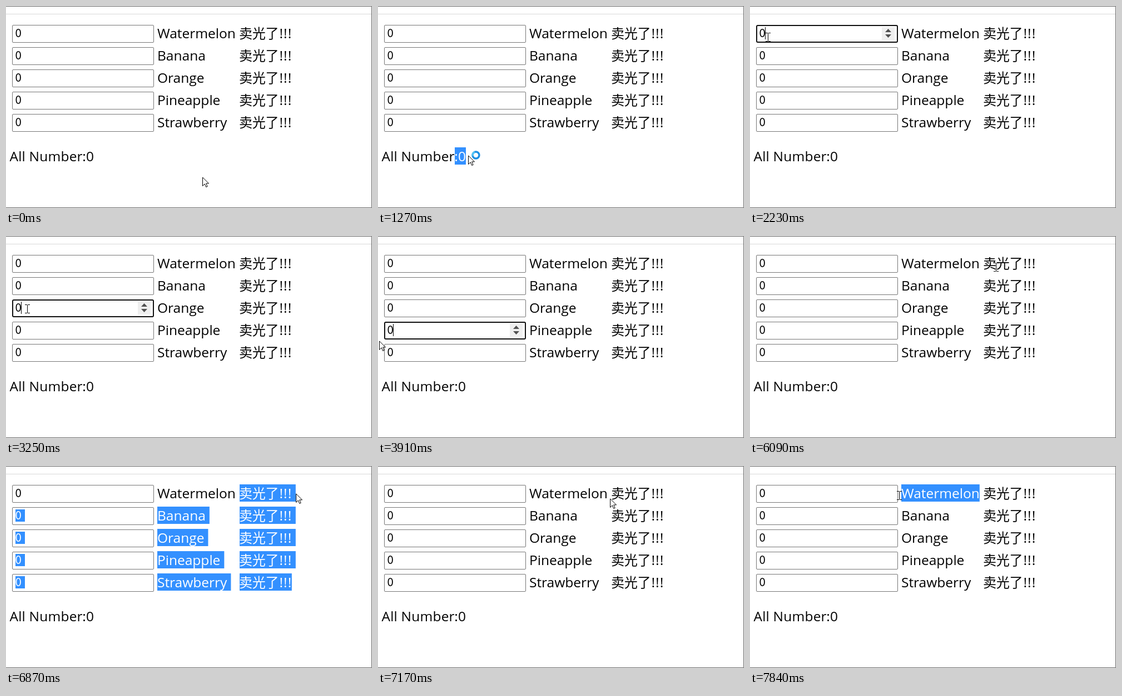
Write an HTML page that moves like this. It is 658 px wide and 363 px high and loops after 7990 ms.

```html
<!DOCTYPE html>
<html lang="en">
<head>
<meta charset="utf-8">
<title>Fruit stock</title>
<style>
  html, body { margin: 0; width: 100%; height: 100%; overflow: hidden; background: #fff; }
  svg { display: block; }
  text { font: 24.5px "Open Sans", "Noto Sans", sans-serif; fill: #000; white-space: pre; }
  .total { letter-spacing: .2px; }
  .cjk, .num { font: 24px "Noto Sans CJK SC", "Noto Sans CJK", "Noto Sans CJK JP", sans-serif; }
  .num { font-size: 20.5px; }
  .on { fill: #fff; }
  .mark { fill: #3390ff; }
</style>
</head>
<body>
<svg id="stage" width="658" height="363" viewBox="0 0 658 363"></svg>
<script>
const LOOP = 7990;
const STEP = 136; // typical time between screen updates
const stage = document.getElementById('stage');
const labels = ['Watermelon', 'Banana', 'Orange', 'Pineapple', 'Strawberry'];
const status = '卖光了!!!';
const rowTop = i => 34 + 40 * i;
const charX = i => i < 3 ? 420 + 23.7 * i : 491 + 7.6 * (i - 3);

const pen = document.createElement('canvas').getContext('2d');
pen.font = '24.5px "Open Sans", "Noto Sans", sans-serif';
const labelEnds = labels.map(s => 272 + pen.measureText(s).width);

// Pointer passes through the points at even intervals
const route = (...points) => k => {
  const u = k * (points.length - 1);
  const i = Math.min(Math.floor(u), points.length - 2);
  return [0, 1].map(d => Math.round(points[i][d] + (points[i + 1][d] - points[i][d]) * (u - i)));
};

// Pointer swings out to the left between clicks on successive rows
const weave = (a, b) => k => [
  Math.round(19 + 19 * Math.cos(2 * Math.PI * (b - a) * k)),
  Math.round(51 + 40 * (a + (b - a) * k))
];

const acts = [
  { from: 40, to: 720, at: route([353, 307], [141, 270]) },
  { from: 1000, to: 1960, at: route([148, 270], [164, 268], [36, 175], [32, 80]),
    sel: () => 'total', busy: k => k > .1 && k < .5 },
  { from: 2110, to: 3130, at: weave(0, 1), focus: k => Math.round(k) },
  { from: 3250, to: 4180, at: weave(2, 4), focus: k => Math.round(2 + 2 * k) },
  { from: 4330, to: 4870, at: route([22, 214], [162, 285], [163, 276]),
    focus: () => 4, sel: () => 'field' },
  { from: 5150, to: 6090, at: route([172, 271], [507, 148], [442, 56]) },
  { from: 6210, to: 7170, at: route([421, 52], [470, 50], [521, 50], [521, 49], [417, 58]),
    sel: k => k < .5 ? 'cell' : k < 1 ? 'table' : '' },
  { from: 7290, to: 7410, at: route([385, 57], [349, 57]) },
  { from: 7690, to: 7840, at: route([300, 54], [268, 53]), sel: () => 'word' }
];

const box = (x, y, w, h, attrs) =>
  `<rect x="${x}" y="${y}" width="${w}" height="${h}" ${attrs}/>`;
const mark = (x0, x1, y, h) => box(x0, y, x1 - x0, h, 'class="mark"');
const text = (x, y, str, cls = '', on = false) =>
  `<text x="${x}" y="${y}" class="${cls}${on ? ' on' : ''}">${str}</text>`;

function field(i, focused, hover, sel) {
  const y = rowTop(i);
  const on = sel === 'field' && focused || sel === 'table' && i > 0;
  let s = focused
    ? box(12, y + 1, 253, 30, 'rx="2" fill="#fff" stroke="#101010" stroke-width="2"')
    : box(11.5, y + .5, 254, 31, `rx="1.5" fill="#fff" stroke="${hover ? '#4f4f4f' : '#767676'}"`);
  if (on) s += mark(17, focused ? 28 : 34, y + 4, 22);
  s += text(16.5, y + 22, '0', 'num', on);
  if (focused && !on) s += box(27, y + 4, 1, 22, 'fill="#000"');
  if (focused || hover) {
    s += box(237, y + 4, 23, 23, 'fill="#efefef"') +
      `<path d="M243 ${y + 13}l5.5-6 5.5 6zM243 ${y + 17}l5.5 6 5.5-6z" fill="#505050"/>`;
  }
  return s;
}

function row(i, focus, hover, sel, x) {
  const y = rowTop(i), base = y + 24;
  const all = sel === 'table';
  const labelOn = all && i > 0 || sel === 'word' && i === 0;
  const picked = k => all || sel === 'cell' && i === 0 && charX(k + 1) <= x + 4;
  const count = [...status].filter((_, k) => picked(k)).length;
  let s = field(i, focus === i, hover === i, sel);
  if (labelOn) s += mark(272, labelEnds[i] + (all ? 7 : 0), y - 1, 31);
  if (count) s += mark(420, charX(count) + (all && i < 4 ? 7 : 0), y - 1, 31);
  s += text(272, base, labels[i], '', labelOn);
  [...status].forEach((c, k) => {
    s += text(charX(k) + (k < 3 ? -1 : .5), base, c, k < 3 ? 'cjk' : '', picked(k));
  });
  return s;
}

const total = on => (on ? mark(138, 158, 254, 31) : '') +
  text(6.5, 279, 'All Number', 'total') + text(137.3, 279, ':0', 'total', on);

function isOverText(x, y) {
  if (x >= 6 && x < 158 && y >= 254 && y < 285) return true;
  return labels.some((_, i) => y >= rowTop(i) - 1 && y < rowTop(i) + 31 &&
    (x >= 267 && x <= labelEnds[i] || x >= 420 && x < 514));
}

function pointer(x, y, beam, busy) {
  if (beam) {
    return `<path transform="translate(${x} ${y})" fill="none" stroke="#000"
      d="M-4-7.5H0M1-7.5H5M.5-7V7M-4 7.5H0M1 7.5H5"/>`;
  }
  let s = `<path transform="translate(${x} ${y})" fill="#fff" stroke="#000"
    d="M.5.9V16.4L4.2 12.8 6.7 18.4 9.1 17.4 6.7 11.9H11.5Z"/>`;
  if (busy) {
    s += `<g transform="translate(${x + 14} ${y})" fill="none" stroke-width="3.4">
      <circle r="6" stroke="#1c8fe3"/><path d="M-5.8 1.5A6 6 0 0 1-2-5.7" stroke="#54c4f4"/></g>`;
  }
  return s;
}

function draw(act, k) {
  const focus = act.focus ? act.focus(k) : -1;
  const sel = act.sel ? act.sel(k) : '';
  const [x, y] = act.at(k);
  const hover = x >= 11 && x < 266
    ? labels.findIndex((_, i) => y >= rowTop(i) && y < rowTop(i) + 32) : -1;
  let s = box(0, 0, 658, 363, 'fill="#fff"') + box(0, 14, 657, 1, 'fill="#d9d9d9"');
  labels.forEach((_, i) => s += row(i, focus, hover, sel, x));
  s += total(sel === 'total');
  s += '<path d="M0 .5H657.5V362.5H0" fill="none" stroke="#666"/>';
  s += pointer(x, y, hover >= 0 || isOverText(x, y), act.busy && act.busy(k));
  stage.innerHTML = s;
}

// Progress of an act, held between screen updates
function progress(act, t) {
  const span = act.to - act.from;
  const n = Math.round(span / STEP);
  const done = Math.floor((t - act.from + 30) / span * n);
  return Math.max(0, Math.min(1, done / n));
}

const began = performance.now();
let shown = '';
function tick() {
  const t = (performance.now() - began) % LOOP;
  const act = acts.filter(a => a.from <= t).pop() || acts[0];
  const k = progress(act, t);
  const key = act.from + ':' + k;
  if (key !== shown) draw(act, k);
  shown = key;
  requestAnimationFrame(tick);
}
tick();
</script>
</body>
</html>
```
